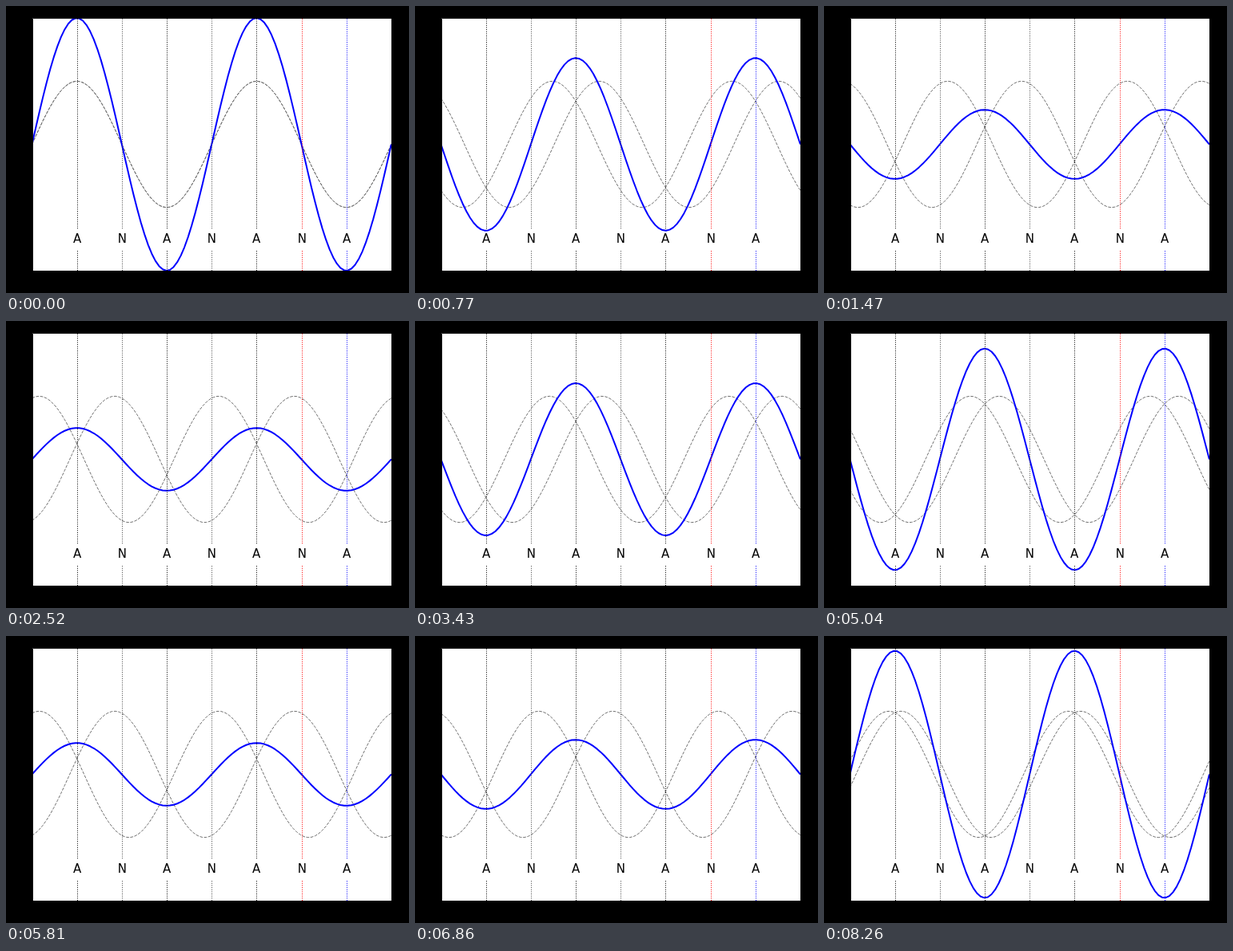
An HTML page that plays this animation: 504 px wide and 360 px high, repeating every 8330 ms.

```html
<!DOCTYPE html>
<html lang="en">
<head>
<meta charset="utf-8">
<title>Standing wave</title>
<style>
  html, body { margin: 0; width: 504px; height: 360px; overflow: hidden; background: #000; }
  svg { display: block; }
  path { fill: none; }
  .part { stroke: #707070; stroke-width: 1; stroke-dasharray: 3.7 1.6; }
  .sum { stroke: #00f; stroke-width: 2; stroke-linejoin: round; }
  .mark { stroke-width: 1; stroke-dasharray: 1 1.65; }
  .frame { stroke: #000; stroke-width: .9; }
  text { font: 15px "DejaVu Sans", sans-serif; text-anchor: middle; }
</style>
</head>
<body>
<svg width="504" height="360">
  <clipPath id="plot"><rect x="33" y="15" width="449" height="317"/></clipPath>
  <rect x="33" y="15" width="449" height="317" fill="#fff"/>
  <g clip-path="url(#plot)">
    <path class="part" id="left"/>
    <path class="part" id="right"/>
    <path class="sum" id="sum"/>
    <g id="marks"></g>
    <path class="frame" d="M33.5 332V15.5H482"/>
  </g>
</svg>
<script>
const LEFT = 32.5, WIDTH = 449.4, MID = 173.5, AMP = 79.2;
const STEP = 70, STEPS = 119, CYCLES = 4, POINTS = 100;
const get = id => document.getElementById(id);

// Nodes (N) and antinodes (A) lie a quarter wavelength apart.
const colors = ['#000', '#444', '#000', '#444', '#000', '#f00', '#00f'];
get('marks').innerHTML = colors.map((color, i) => {
  const x = Math.round(LEFT + (i + 1) * WIDTH / 8) + .5;
  return `<path class="mark" stroke="${color}" d="M${x} 332V305.5M${x} 279.2V15"/>
    <text x="${x - .25}" y="297">${i % 2 ? 'N' : 'A'}</text>`;
}).join('');

function plot(id, wave) {
  let d = '';
  for (let i = 0; i < POINTS; i++) {
    const u = i / (POINTS - 1);
    const y = MID - AMP * wave(4 * Math.PI * u);
    d += `${i ? 'L' : 'M'}${(LEFT + u * WIDTH).toFixed(2)} ${y.toFixed(2)}`;
  }
  get(id).setAttribute('d', d);
}

function draw(now) {
  const step = Math.floor(now / STEP) % STEPS;
  const phase = 2 * Math.PI * CYCLES * step / STEPS;
  plot('left', a => Math.sin(a + phase));
  plot('right', a => Math.sin(a - phase));
  plot('sum', a => 2 * Math.sin(a) * Math.cos(phase));
}

const start = performance.now();
function tick() {
  draw(performance.now() - start);
  requestAnimationFrame(tick);
}
tick();
</script>
</body>
</html>
```
